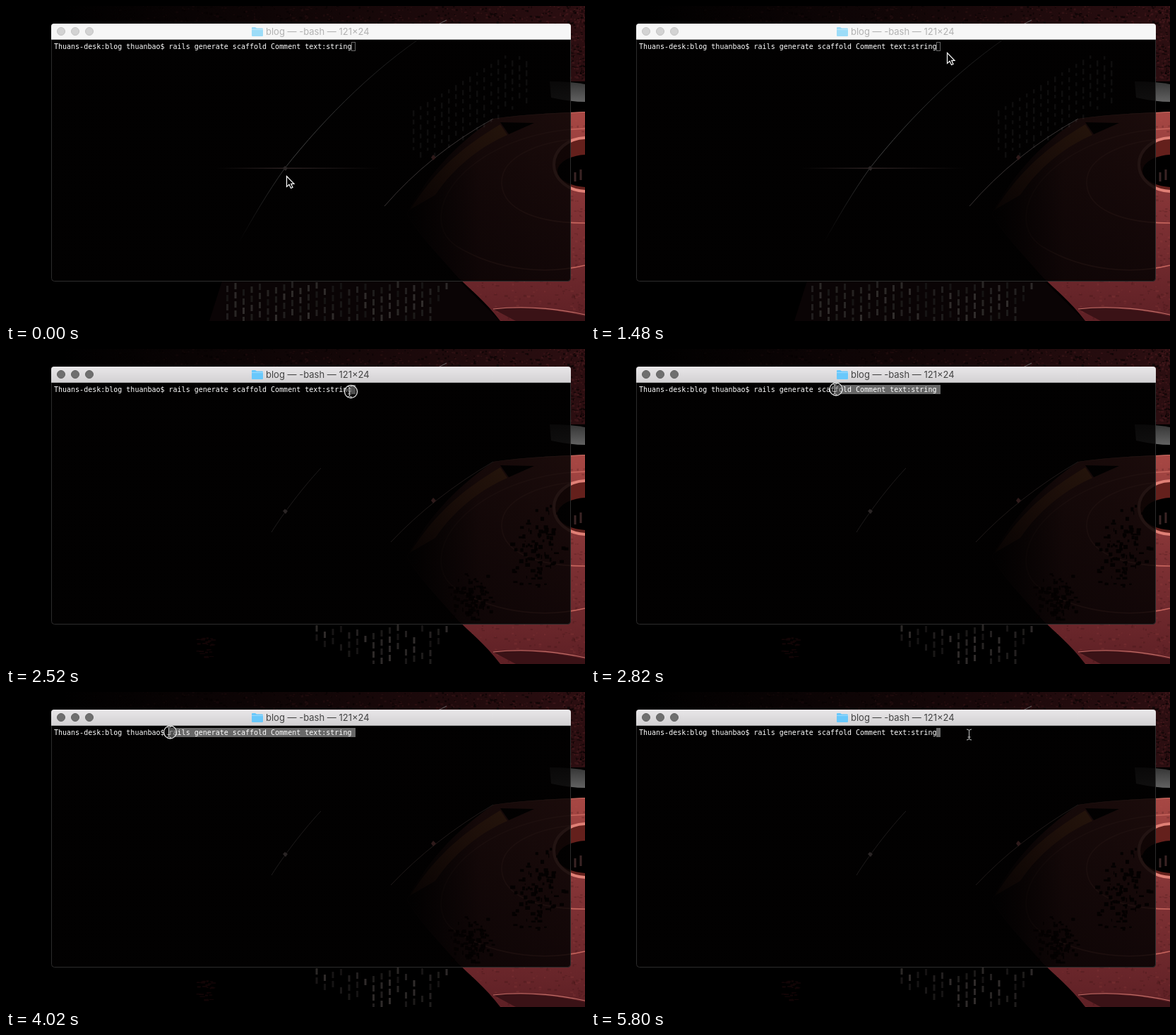
These frames come from a looping animation (820x447 px, 8000 ms). An HTML page:

```html
<!DOCTYPE html>
<html lang="en">
<head>
<meta charset="utf-8">
<title>Terminal</title>
<style>
html, body { margin: 0; width: 100%; height: 100%; overflow: hidden; background: #000; }
svg { display: block; width: 820px; height: 447px; }
.title { font: 13px Inter, "Liberation Sans", sans-serif; fill: #b2b2b2; }
.line { font: 10px "DejaVu Sans Mono", monospace; fill: #fff; }
.btn { fill: #d3d3d3; stroke: #c4c4c4; }
.folder { fill: #9cdcf8; }
.bar { fill: #f6f6f6; }
.caret { fill: none; stroke: #686868; }
.focused .title { fill: #434343; }
.focused .btn { fill: #6f6f6f; stroke: #636363; }
.focused .folder { fill: #69c8fb; }
.focused .bar { fill: url(#barOn); }
.focused .caret { fill: #686868; }
.focused .idle, .active { display: none; }
.focused .active { display: inline; }
</style>
</head>
<body>
<svg id="stage" viewBox="0 0 820 447">
  <defs>
    <linearGradient id="sky" gradientUnits="userSpaceOnUse" x1="80" x2="820"><stop offset="0" stop-color="#000"/><stop offset=".5" stop-color="#120607"/><stop offset="1" stop-color="#2c0e11"/></linearGradient>
    <linearGradient id="skin" x2="0" y2="1"><stop offset="0" stop-color="#a84844"/><stop offset=".5" stop-color="#7f3134"/><stop offset="1" stop-color="#5e2025"/></linearGradient>
    <linearGradient id="shade"><stop offset=".1" stop-color="#000"/><stop offset="1" stop-color="#000" stop-opacity="0"/></linearGradient>
    <linearGradient id="metal" x2="0" y2="1"><stop offset="0" stop-color="#343434"/><stop offset="1" stop-color="#626262"/></linearGradient>
    <linearGradient id="glass"><stop offset=".6" stop-color="#020101" stop-opacity=".92"/><stop offset="1" stop-color="#020101" stop-opacity=".85"/></linearGradient>
    <linearGradient id="barOn" x2="0" y2="1"><stop offset="0" stop-color="#e9e7e9"/><stop offset="1" stop-color="#d3d1d3"/></linearGradient>
    <linearGradient id="arc" gradientUnits="userSpaceOnUse" x1="330" y1="335" x2="620" y2="22"><stop offset="0" stop-color="#444" stop-opacity="0"/><stop offset=".35" stop-color="#444"/><stop offset=".6" stop-color="#2a2a2a"/><stop offset="1" stop-color="#2a2a2a" stop-opacity=".3"/></linearGradient>
    <linearGradient id="flare"><stop offset="0" stop-color="#2c2222" stop-opacity="0"/><stop offset=".42" stop-color="#2c2222"/><stop offset="1" stop-color="#2c2222" stop-opacity="0"/></linearGradient>
    <linearGradient id="gold" x1="0" y1="1" x2="1" y2="0"><stop offset="0" stop-color="#160a06" stop-opacity=".3"/><stop offset="1" stop-color="#24140b"/></linearGradient>
    <clipPath id="face"><path d="M568 295C600 235 640 195 690 160C735 153 780 152 820 150V447H700C680 420 655 400 640 385C610 350 585 325 568 295Z"/></clipPath>
  </defs>

  <rect width="820" height="447"/>
  <path d="M80 0H820V107H799V26H80Z" fill="url(#sky)"/>
  <g id="rock"></g>
  <path d="M612 26L624 20" stroke="#666"/>
  <path d="M770 107Q800 107 820 111V136Q800 136 772 130Z" fill="url(#metal)"/>
  <path class="idle" d="M306 390H642L700 447H288Z" fill="#0a0405"/>
  <g id="slots"></g>
  <g id="embers" class="active"></g>

  <g clip-path="url(#face)">
    <rect x="560" y="148" width="260" height="299" fill="url(#skin)"/>
    <g id="grunge"></g>
    <path d="M690 160C735 153 780 152 820 150" fill="none" stroke="#d4786c" stroke-width="1.500"/>
    <g fill="none" stroke="#c8665e" stroke-width="1.500">
      <path d="M820 174C740 176 680 205 645 240C610 276 605 320 640 342C700 378 770 380 820 368"/>
      <path d="M820 188C760 190 702 212 702 250C702 288 750 308 820 308"/>
    </g>
    <path d="M690 430Q750 425 820 440V447H722Z" fill="#3a1216"/>
    <path d="M690 430Q750 423 820 438" fill="none" stroke="#c06c66" stroke-width="1.200"/>
    <ellipse cx="822" cy="225" rx="46" ry="38" fill="#64201c" stroke="#e08076" stroke-width="4"/>
    <ellipse cx="824" cy="234" rx="43" ry="23"/>
    <path d="M806 236v13M814 232v15" stroke="#3a2424" stroke-width="3"/>
    <path d="M700 165L748 166L712 182Z"/>
    <rect x="560" y="148" width="110" height="242" fill="url(#shade)"/>
  </g>

  <rect x="64.500" y="25.500" width="735" height="365" rx="4" fill="url(#glass)" stroke="#2c2c2c"/>
  <g fill="none">
    <g class="idle">
      <path d="M330 335C350 300 370 265 395 230C450 160 530 78 620 24" stroke="url(#arc)"/>
      <rect x="298" y="229.500" width="232" height="1.500" fill="url(#flare)"/>
      <path d="M536 284Q600 210 690 160" stroke="#3a3434"/>
      <g id="dots" fill="#fff" fill-opacity=".05"></g>
    </g>
    <g class="active">
      <path d="M376 260C385 245 415 202 446 169" stroke="#1e1b1b"/>
      <path d="M545 274Q605 210 690 160" stroke="#1f1918"/>
      <g id="patches" fill="#040101"></g>
    </g>
    <path d="M572 289C610 230 650 198 700 168L710 183C670 200 632 232 608 268Z" fill="url(#gold)"/>
    <path d="M392 230L395 227L399 230L396 234Z" fill="#2a2525"/>
    <path d="M602 215L605 211L609 215L605 219Z" fill="#2e1a1a"/>
  </g>

  <path class="bar" d="M64 47V29Q64 25 68 25H796Q800 25 800 29V47Z"/>
  <path d="M64 47.500H800" stroke="#aaa"/>
  <circle class="btn" cx="78" cy="36" r="5.500"/>
  <circle class="btn" cx="98" cy="36" r="5.500"/>
  <circle class="btn" cx="118" cy="36" r="5.500"/>
  <path class="folder" d="M348 31Q348 30 349 30H353L355 31.500H363Q364 31.500 364 33V42Q364 43 363 43H349Q348 43 348 42Z"/>
  <path d="M348 33.500H364" stroke="#fff" stroke-opacity=".35"/>
  <text class="title" x="368" y="41">blog — -bash — 121×24</text>

  <rect class="caret" x="489.500" y="51.500" width="5" height="12"/>
  <rect id="sel" y="51" height="13" fill="#686868"/>
  <text class="line" x="68" y="61">Thuans-desk:blog thuanbao$ rails generate scaffold Comment text:string</text>

  <path id="arrow" d="M.5 .5V15.500L4 12.300L6.500 17.500L9 16.500L6.700 11.300H11Z" stroke="#fff" stroke-width="1.200"/>
  <g id="beam" fill="none">
    <circle id="ring" cx="2" r="9" fill="#222" fill-opacity=".35" stroke="#e4e4e4" stroke-width="1.300"/>
    <path d="M-3.500 -7.500Q0 -7.500 0 -5.500V5.500Q0 7.500 -3.500 7.500M3.500 -7.500Q0 -7.500 0 -5.500M0 5.500Q0 7.500 3.500 7.500M-2 3.500H2" stroke="#c4c4c4"/>
  </g>
</svg>
<script>
const $ = id => document.getElementById(id);
const LOOP = 8000, LEFT = 68, CELL = 6.02, END = 495;

let seed = 7;
const rnd = (a = 0, b = 1) => {
  seed = (seed * 16807) % 2147483647;
  return a + (b - a) * seed / 2147483647;
};
const spread = r => (rnd(-r, r) + rnd(-r, r)) / 2;

function box(parent, x, y, w, h, fill) {
  const r = document.createElementNS("http://www.w3.org/2000/svg", "rect");
  const attrs = { x, y, width: w, height: h };
  if (fill) attrs.fill = fill;
  for (const k in attrs) r.setAttribute(k, attrs[k]);
  $(parent).append(r);
}

function drawRock() {
  for (let i = 0; i < 600; i++) {
    const side = i % 4 === 0;
    const x = side ? rnd(798, 820) : 820 - 700 * rnd() ** 1.4;
    const y = side ? rnd(0, 104) : rnd(-1, 25);
    const v = Math.max(0, (x - 120) / 700);
    const fill = rnd() < .5 ? "rgba(5,2,2,.6)" : `rgb(${58 * v + 4},${20 * v + 2},${23 * v + 2})`;
    box("rock", x, y, rnd(1, 4), rnd(1, 3), fill);
  }
}

// rows of slots climb to the right
function drawSlots() {
  for (let c = 0; c < 28; c++) {
    for (let r = 0; r < 9; r++) {
      const x = 312 + c * 11.5;
      const y = 384 + r * 13 - (c * 4) % 13;
      if (y < 391 || y > 442 || x > 630 - (y - 391) * .6) continue;
      const g = Math.round(rnd(20, 50));
      box("slots", x, y, 3, 9, `rgb(${g},${g * .92},${g * .9})`);
      const bright = x > 425 && y < 408 + (x - 425) * .4;
      if (!bright || rnd() < .15) $("slots").lastChild.classList.add("idle");
    }
  }
  for (let x = 576; x < 740; x += 10) {
    for (let y = 70; y < 210; y += 13) {
      const d = y + (x - 576) * .6;
      if (d > 135 && d < 222) box("dots", x, y + (x * .7) % 13, 2.5, rnd(4, 9));
    }
  }
}

function drawGrunge() {
  for (let i = 0; i < 200; i++) {
    const low = i % 2;
    box("grunge", low ? rnd(650, 820) : rnd(798, 820), low ? rnd(390, 447) : rnd(155, 447),
      rnd(1, 5), rnd(1, 3), rnd() < .6 ? "rgba(40,10,14,.2)" : "rgba(200,100,90,.1)");
  }
  for (let i = 0; i < 200; i++) {
    const left = i % 2;
    box("patches", left ? 655 + spread(36) : 752 + spread(42), left ? 350 + spread(38) : 285 + spread(66),
      rnd(1, 7), rnd(2, 6));
  }
  for (let i = 0; i < 26; i++) {
    box("embers", rnd(268, 292), rnd(409, 437), rnd(2, 8), rnd(1, 3), "#120506");
  }
}

// time, x, y, pointer: a arrow, i beam, d beam pressed
const steps = [
  [0, 397, 241, "a"], [600, 403, 241, "a"],
  [890, 408, 233, "a"], [1040, 432, 190, "a"], [1190, 470, 123, "a"], [1330, 497, 80, "a"], [1480, 504, 66, "a"],
  [1630, 504.5, 65.5, "d"], [1780, 504.5, 66, "i"], [1920, 504.5, 66.5, "i"],
  [2070, 501, 64, "i"], [2220, 494, 61, "i"], [2370, 488, 60, "i"],
  [2520, 486.5, 60.5, "d"], [2670, 455, 59, "d"], [2820, 345, 57, "d"], [2970, 272.5, 57, "d"],
  [3270, 262.5, 57.5, "d"], [3420, 254, 57, "d"], [3570, 244, 57, "d"], [3720, 236, 57, "d"],
  [4020, 230.5, 57, "d"],
  [4470, 235, 57, "i"], [4620, 310, 58, "i"], [4770, 465, 60, "i"], [4910, 540.5, 61.5, "i"],
  [5360, 539, 60, "i"], [5510, 537, 59, "d"], [5650, 536, 59.5, "d"], [5800, 535.5, 60.5, "i"]
];

function selectionStart(t, x) {
  if (t < 2670 || t >= 5510) return END;
  const col = t < 4020 ? Math.round((x - LEFT) / CELL) : 27;
  return LEFT + col * CELL;
}

function render(t) {
  const [, x, y, kind] = steps.findLast(s => s[0] <= t);
  const isArrow = kind === "a";
  const from = selectionStart(t, x);
  $("stage").classList.toggle("focused", t >= 1630);
  $("arrow").style.display = isArrow ? "" : "none";
  $("beam").style.display = isArrow ? "none" : "";
  $("ring").style.display = kind === "d" ? "" : "none";
  $(isArrow ? "arrow" : "beam").setAttribute("transform", `translate(${x} ${y})`);
  $("sel").setAttribute("x", from);
  $("sel").setAttribute("width", END - from);
}

function tick() {
  render(performance.now() % LOOP);
  requestAnimationFrame(tick);
}

drawRock();
drawSlots();
drawGrunge();
tick();
</script>
</body>
</html>
```
